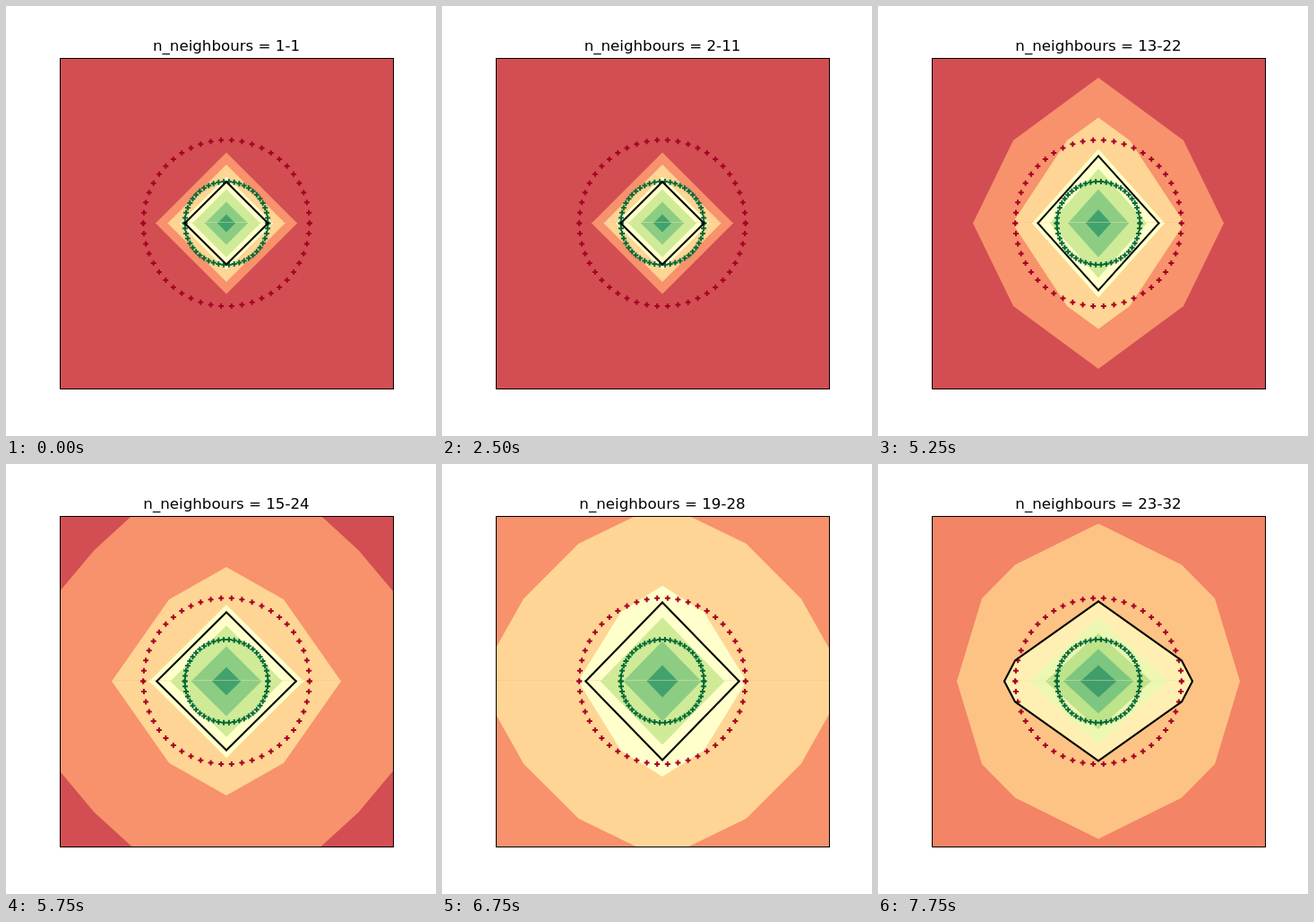
An HTML page without scripts that plays this animation: 480x480 px, repeating every 8 s.

```html
<!DOCTYPE html>
<html lang="en">
<head>
<meta charset="utf-8">
<title>Neighbour window contours</title>
<style>
@property --last { syntax: "<integer>"; inherits: true; initial-value: 1; }

html, body { margin: 0; width: 100%; height: 100%; overflow: hidden; background: #fff; }
svg { position: absolute; left: 0; top: 0; width: 480px; height: 480px; animation: palette 8s step-end infinite; }

h1 {
  position: absolute; left: 12px; top: 35px; width: 468px; margin: 0; z-index: 1;
  font: 16.67px/20px "DejaVu Sans", sans-serif; text-align: center; white-space: pre; color: #000;
  animation: count 8s steps(32) infinite;
}
h1 span { counter-reset: first max(1, calc(var(--last) - 9)) last var(--last); }
h1 span::after { content: counter(first) "-" counter(last); }
@keyframes count { from { --last: 1; } to { --last: 33; } }

@keyframes palette {
  0%     { --c0: #d34e52; --c1: #f7926c; --c2: #fed594; --c3: #ffffcc; --c4: #cfeb97; --c5: #8ccd83; --c6: #42a26d; }
  87.5%  { --c0: #d85352; --c1: #d85352; --c2: #faa475; --c3: #feeaa9; --c4: #e6f4a9; --c5: #9ed585; --c6: #44a670; }
  93.75% { --c0: #f38466; --c1: #fdc385; --c2: #ffefb2; --c3: #ecf7b2; --c4: #bde38b; --c5: #7dc680; --c6: #409e6b; }
}

/* Each outline is one quadrant, drawn in four mirrored groups. */
.nw { transform: scale(-1, -1); }
.ne { transform: scale(1, -1); }
.sw { transform: scale(-1, 1); }
.quad path { animation: 8s step-end infinite; }
.quad .b1 { fill: var(--c1); animation-name: band1; }
.quad .b2 { fill: var(--c2); animation-name: band2; }
.quad .b3 { fill: var(--c3); animation-name: band3; }
.quad .b4 { fill: var(--c4); animation-name: band4; }
.quad .b5 { fill: var(--c5); animation-name: band5; }
.quad .b6 { fill: var(--c6); animation-name: band6; }
.quad .edge { fill: none; stroke: #000; stroke-width: 2.08; stroke-linecap: round; stroke-linejoin: round; animation-name: edge; }

@keyframes band1 {
  0%      { d: path("M0-.6V79L0 79 0 79 79 0V-.6Z"); }
  53.125% { d: path("M0-.6V89L0 89 0 89 79 0V-.6Z"); animation-timing-function: steps(4); }
  65.625% { d: path("M0-.6V162.5L95 92.5 95 92.5 140 0V-.6Z"); animation-timing-function: steps(4); }
  78.125% { d: path("M0-.6V400L200 200 200 200 400 0V-.6Z"); }
  93.75%  { d: path("M0-.6V174L93 125 122 92.5 151 0V-.6Z"); }
  96.875% { d: path("M0-.6V176L93 130 130 92.5 158 0V-.6Z"); }
}
@keyframes band2 {
  0%      { d: path("M0-.6V65.5L0 65.5 0 65.5 65.5 0V-.6Z"); }
  53.125% { d: path("M0-.6V73.5L0 73.5 0 73.5 65.5 0V-.6Z"); animation-timing-function: steps(4); }
  65.625% { d: path("M0-.6V118L35 92.5 35 92.5 96 0V-.6Z"); animation-timing-function: steps(4); }
  78.125% { d: path("M0-.6V137L93 90 93 90 160 0V-.6Z"); animation-timing-function: steps(3); }
  87.5%   { d: path("M0-.6V230L94 185 186 93 230 0V-.6Z"); }
  93.75%  { d: path("M0-.6V90L93 14 93 14 100 0V-.6Z"); }
  96.875% { d: path("M0-.6V89L93 23 93 23 105 0V-.6Z"); }
}
@keyframes band3 {
  0%      { d: path("M0-.6V52L26 26 52 0 52 0V-.6Z"); }
  53.125% { d: path("M0-.6V58L26 29 52 0 52 0V-.6Z"); animation-timing-function: steps(4); }
  65.625% { d: path("M0-.6V83L37 41.5 74 0 74 0V-.6Z"); animation-timing-function: steps(4); }
  78.125% { d: path("M0-.6V88L46 46.8 93 5 101 0V-.6Z"); animation-timing-function: steps(3); }
  87.5%   { d: path("M0-.6V116L46.5 92.5 93 0 93 0V-.6Z"); }
  93.75%  { d: path("M0-.6V72L37.5 36 75 0 75 0V-.6Z"); }
  96.875% { d: path("M0-.6V71L39 35.5 78 0 78 0V-.6Z"); }
}
@keyframes band4 {
  0%      { d: path("M0-.6V38L38 0V-.6Z"); }
  53.125% { d: path("M0-.6V42L38 0V-.6Z"); animation-timing-function: steps(4); }
  65.625% { d: path("M0-.6V61L54 0V-.6Z"); animation-timing-function: steps(4); }
  78.125% { d: path("M0-.6V63.5L71 0V-.6Z"); animation-timing-function: steps(3); }
  87.5%   { d: path("M0-.6V75L68.5 0V-.6Z"); }
  93.75%  { d: path("M0-.6V54L56 0V-.6Z"); }
  96.875% { d: path("M0-.6V53.5L59 0V-.6Z"); }
}
@keyframes band5 {
  0%      { d: path("M0-.6V24L24 0V-.6Z"); }
  53.125% { d: path("M0-.6V26.5L24 0V-.6Z"); animation-timing-function: steps(4); }
  65.625% { d: path("M0-.6V38L34 0V-.6Z"); animation-timing-function: steps(4); }
  78.125% { d: path("M0-.6V40L44.5 0V-.6Z"); animation-timing-function: steps(3); }
  87.5%   { d: path("M0-.6V47L43 0V-.6Z"); }
  93.75%  { d: path("M0-.6V36L37.5 0V-.6Z"); }
  96.875% { d: path("M0-.6V36L39 0V-.6Z"); }
}
@keyframes band6 {
  0%      { d: path("M0-.6V10L10 0V-.6Z"); }
  53.125% { d: path("M0-.6V11L10 0V-.6Z"); animation-timing-function: steps(4); }
  65.625% { d: path("M0-.6V15.5L14 0V-.6Z"); animation-timing-function: steps(4); }
  78.125% { d: path("M0-.6V16L18 0V-.6Z"); animation-timing-function: steps(3); }
  87.5%   { d: path("M0-.6V19L17 0V-.6Z"); }
  93.75%  { d: path("M0-.6V18L19 0V-.6Z"); }
  96.875% { d: path("M0-.6V18L20 0V-.6Z"); }
}
@keyframes edge {
  0%      { d: path("M0 46.2L46.5 0 46.5 0"); }
  53.125% { d: path("M0 52L46.5 0 46.5 0"); animation-timing-function: steps(4); }
  65.625% { d: path("M0 75L67.5 0 67.5 0"); animation-timing-function: steps(4); }
  78.125% { d: path("M0 79L88 0 88 0"); animation-timing-function: steps(3); }
  87.5%   { d: path("M0 92.5L84.5 0 84.5 0"); animation-timing-function: steps(2); }
  93.75%  { d: path("M0 90L93 14 100 0"); }
  96.875% { d: path("M0 89L93 23 105 0"); }
}

#ring use {
  --turn: calc(var(--k) * 7.2deg);
  transform: rotate(var(--turn)) translate(var(--r)) rotate(calc(-1 * var(--turn)));
}
.inner { --r: 46.4px; stroke: #006837; }
.outer { --r: 92.8px; stroke: #a50026; }
</style>
</head>
<body>
<h1>n_neighbours = <span></span></h1>
<svg viewBox="0 0 480 480">
  <defs>
    <clipPath id="axes"><rect x="60" y="58" width="373" height="370"/></clipPath>
    <path id="plus" d="M-3 0H3M0-3V3" stroke-width="2"/>
    <g id="ring">
      <use href="#plus" style="--k:0"/><use href="#plus" style="--k:1"/>
      <use href="#plus" style="--k:2"/><use href="#plus" style="--k:3"/>
      <use href="#plus" style="--k:4"/><use href="#plus" style="--k:5"/>
      <use href="#plus" style="--k:6"/><use href="#plus" style="--k:7"/>
      <use href="#plus" style="--k:8"/><use href="#plus" style="--k:9"/>
      <use href="#plus" style="--k:10"/><use href="#plus" style="--k:11"/>
      <use href="#plus" style="--k:12"/>
    </g>
    <g id="rings"><use href="#ring" class="outer"/><use href="#ring" class="inner"/></g>
  </defs>
  <g clip-path="url(#axes)">
    <rect x="60" y="58" width="373" height="370" style="fill:var(--c0)"/>
    <g transform="translate(246 242.4)">
      <g class="quad nw">
        <path class="b1"/><path class="b2"/><path class="b3"/><path class="b4"/><path class="b5"/><path class="b6"/>
      </g>
      <g class="quad ne">
        <path class="b1"/><path class="b2"/><path class="b3"/><path class="b4"/><path class="b5"/><path class="b6"/>
      </g>
      <g class="quad sw">
        <path class="b1"/><path class="b2"/><path class="b3"/><path class="b4"/><path class="b5"/><path class="b6"/>
      </g>
      <g class="quad se">
        <path class="b1"/><path class="b2"/><path class="b3"/><path class="b4"/><path class="b5"/><path class="b6"/>
      </g>
      <use href="#rings" class="nw"/><use href="#rings" class="ne"/>
      <use href="#rings" class="sw"/><use href="#rings" class="se"/>
      <g class="quad nw"><path class="edge"/></g>
      <g class="quad ne"><path class="edge"/></g>
      <g class="quad sw"><path class="edge"/></g>
      <g class="quad se"><path class="edge"/></g>
    </g>
  </g>
  <rect x="60.5" y="58.5" width="372" height="369" fill="none" stroke="#000"/>
</svg>
</body>
</html>
```
